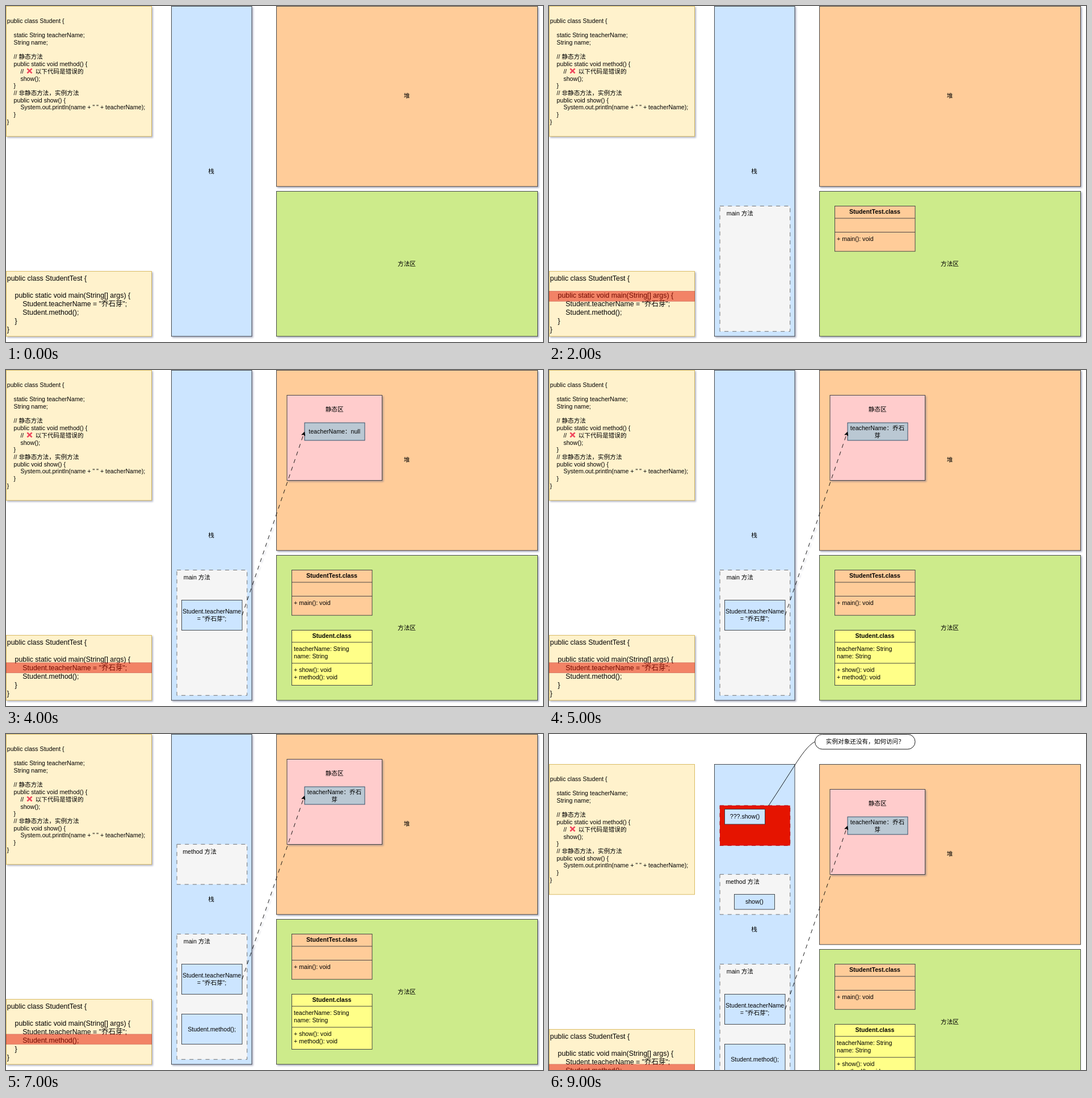
Write an HTML page that moves like this. It is 946 px wide and 592 px high and loops after 10000 ms.

```html
<!DOCTYPE html>
<html lang="zh-CN">
<head>
<meta charset="utf-8">
<title>静态方法</title>
<style>
  html, body { margin: 0; width: 100%; height: 100%; overflow: hidden; background: #fff; }
  svg { display: block; }
  text {
    font-family: "Liberation Sans", "Noto Sans CJK SC", "Noto Sans CJK", sans-serif;
    white-space: pre;
  }
</style>
</head>
<body>
<svg id="stage" width="946" height="592" viewBox="0 0 946 592"></svg>
<script>
const LOOP = 10000, LAST = 10, SHIFT_AT = 9;
const FONT = 10.62, LINE = 12.7;
const INK = '#36393d', BLUE = '#cce5ff', ORANGE = '#ffcc99', YELLOW = '#ffff88', GREY = '#f5f5f5';
const SHADOW = 'drop-shadow(2.66px 2.66px 1.5px rgba(61,69,116,.4))';
const TEACHER = '乔石芽';

function add(parent, tag, attrs, content) {
  const el = document.createElementNS('http://www.w3.org/2000/svg', tag);
  for (const key in attrs) el.setAttribute(key, attrs[key]);
  if (content) el.textContent = content;
  parent.append(el);
  return el;
}

// Corners: left, top, right, bottom.
const rect = (parent, l, t, r, b, fill, stroke = INK, extra = {}) =>
  add(parent, 'rect', { x: l, y: t, width: r - l, height: b - t, fill, stroke, 'stroke-width': 0.9, ...extra });

// y is the middle of the text line.
const label = (parent, x, y, str, extra = {}, size = FONT) =>
  add(parent, 'text', { x, y: y + size * 0.347, 'font-size': size, 'text-anchor': 'middle', ...extra }, str);

const left = (parent, x, y, str, size) => label(parent, x, y, str, { 'text-anchor': 'start' }, size);

const path = (parent, d, extra = {}) =>
  add(parent, 'path', { d, fill: 'none', stroke: '#000', 'stroke-width': 0.9, ...extra });

const DASH = { 'stroke-dasharray': '7.08 7.08' };

// Hard cut between two looks at the given second.
function cut(el, before, after, second) {
  const at = second * 1000 / LOOP;
  el.animate([
    { ...before, offset: 0 }, { ...before, offset: at },
    { ...after, offset: at }, { ...after, offset: 1 }
  ], { duration: LOOP, iterations: Infinity });
}

// A group that is visible from one second up to another.
function during(from, to = LAST) {
  const outer = add(scene, 'g');
  const inner = add(outer, 'g');
  if (from > 0) cut(outer, { opacity: 0 }, { opacity: 1 }, from);
  if (to < LAST) cut(inner, { opacity: 1 }, { opacity: 0 }, to);
  return inner;
}

const scene = add(document.getElementById('stage'), 'g');
cut(scene, { transform: 'translateY(0px)', filter: SHADOW },
           { transform: 'translateY(53px)', filter: 'none' }, SHIFT_AT);

function codeBox(top, bottom, lines, size, step) {
  const g = during(0);
  rect(g, 0.5, top, 256.5, bottom, '#fff2cc', '#d6b656');
  const first = (top + bottom) / 2 - (lines.length - 1) / 2 * step;
  lines.forEach((line, i) => left(g, 1.8, first + i * step, line, size));
  return g;
}

function classBox(g, fill, top, dividers, bottom, title) {
  rect(g, 503.5, top, 645, bottom, fill);
  for (const y of dividers) path(g, `M503.5 ${y}H645`, { stroke: INK });
  label(g, 574, top + 10, title, { 'font-weight': 'bold' });
}

// Code
const student = codeBox(0.5, 229.8, [
  'public class Student {',
  '',
  '    static String teacherName;',
  '    String name;',
  '',
  '    // 静态方法',
  '    public static void method() {',
  '        //',
  '        show();',
  '    }',
  '    // 非静态方法，实例方法',
  '    public void show() {',
  '        System.out.println(name + " " + teacherName);',
  '    }',
  '}'
], FONT, LINE);
left(student, 51.7, 114.9, '以下代码是错误的');
path(student, 'M37.4 110.4L45.6 118.4M45.6 110.4L37.4 118.4',
  { stroke: '#f0445c', 'stroke-width': 2.6 });

codeBox(467.4, 582, [
  'public class StudentTest {',
  '',
  '    public static void main(String[] args) {',
  `        Student.teacherName = "${TEACHER}";`,
  '        Student.method();',
  '    }',
  '}'
], 12.39, 14.87);

// Memory areas
const areas = during(0);
rect(areas, 291.5, 0.5, 433, 582, BLUE);
rect(areas, 476.5, 0.5, 936.5, 318, ORANGE);
rect(areas, 476.5, 326.5, 936.5, 582, '#cdeb8b');
label(areas, 361.5, 291, '栈');
label(areas, 706, 158.8, '堆');
label(areas, 706, 454, '方法区');

// Current line: top edge, first second, last second
for (const [top, from, to] of [[467.2, 1, 2], [502.5, 2, 3], [515.8, 3, 6], [529, 6, LAST]]) {
  rect(during(from, to), 0.5, top, 256.5, top + 17.7, '#e51400', '#b20000', { opacity: 0.5 });
}

const testClass = during(1);
classBox(testClass, ORANGE, 352.5, [374, 398.5], 432.2, 'StudentTest.class');
left(testClass, 507, 410.5, '+ main(): void');

const mainCall = during(2);
rect(mainCall, 301, 352.5, 424.7, 573.3, GREY, '#666', DASH);
label(mainCall, 336.4, 365.8, 'main 方法');

const assign = during(3);
rect(assign, 309.5, 405.5, 416, 458.5, BLUE);
label(assign, 362.6, 425.7, 'Student.teacherName');
label(assign, 362.6, 438.6, `= "${TEACHER}";`);
classBox(assign, YELLOW, 458.5, [479.7, 516.7], 555.5, 'Student.class');
['teacherName: String', 'name: String'].forEach((s, i) => left(assign, 507, 491.6 + i * 13.2, s));
['+ show(): void', '+ method(): void'].forEach((s, i) => left(assign, 507, 528.6 + i * 13.2, s));

// Static area with its arrow
const statics = during(4);
rect(statics, 495, 44.5, 662.5, 194.5, '#ffcccc').style.filter = SHADOW;
label(statics, 578.6, 69, '静态区');
rect(statics, 526, 93, 632, 124, '#bac8d3', '#23445d');
label(during(4, 5), 578.6, 108.5, 'teacherName：null');
const value = during(5);
label(value, 578.6, 102.3, 'teacherName：' + TEACHER.slice(0, 2));
label(value, 578.6, 115.2, TEACHER.slice(2));
const arrow = during(4);
path(arrow, 'M416 432L524 114', DASH);
path(arrow, 'M525.7 109.2L526.6 116L524.2 113.8L520.8 114.1Z', { fill: '#000' });

const call = during(6);
rect(call, 309.5, 493.5, 416, 546.5, BLUE);
label(call, 362.6, 520.2, 'Student.method();');

const methodCall = during(7);
rect(methodCall, 301, 194.3, 424.7, 265, GREY, '#666', DASH);
label(methodCall, 341, 207.3, 'method 方法');

const show = during(8);
rect(show, 326.5, 229.5, 397.5, 256, BLUE);
label(show, 361.8, 242.6, 'show()');

// Failing call and its remark
const failure = during(SHIFT_AT);
rect(failure, 301, 73, 424.7, 143.6, '#e51400', '#b20000', DASH);
rect(failure, 309.5, 79.5, 380.5, 106, BLUE);
label(failure, 345, 92.7, '???.show()');
path(failure, 'M468.5 -39.5C456 -33 444 -15 433 2S403 49 387 73');
rect(failure, 468.5, -52.5, 645, -26.2, '#fff', '#000', { rx: 13.15 });
label(failure, 556.8, -39.4, '实例对象还没有，如何访问？');
</script>
</body>
</html>
```
